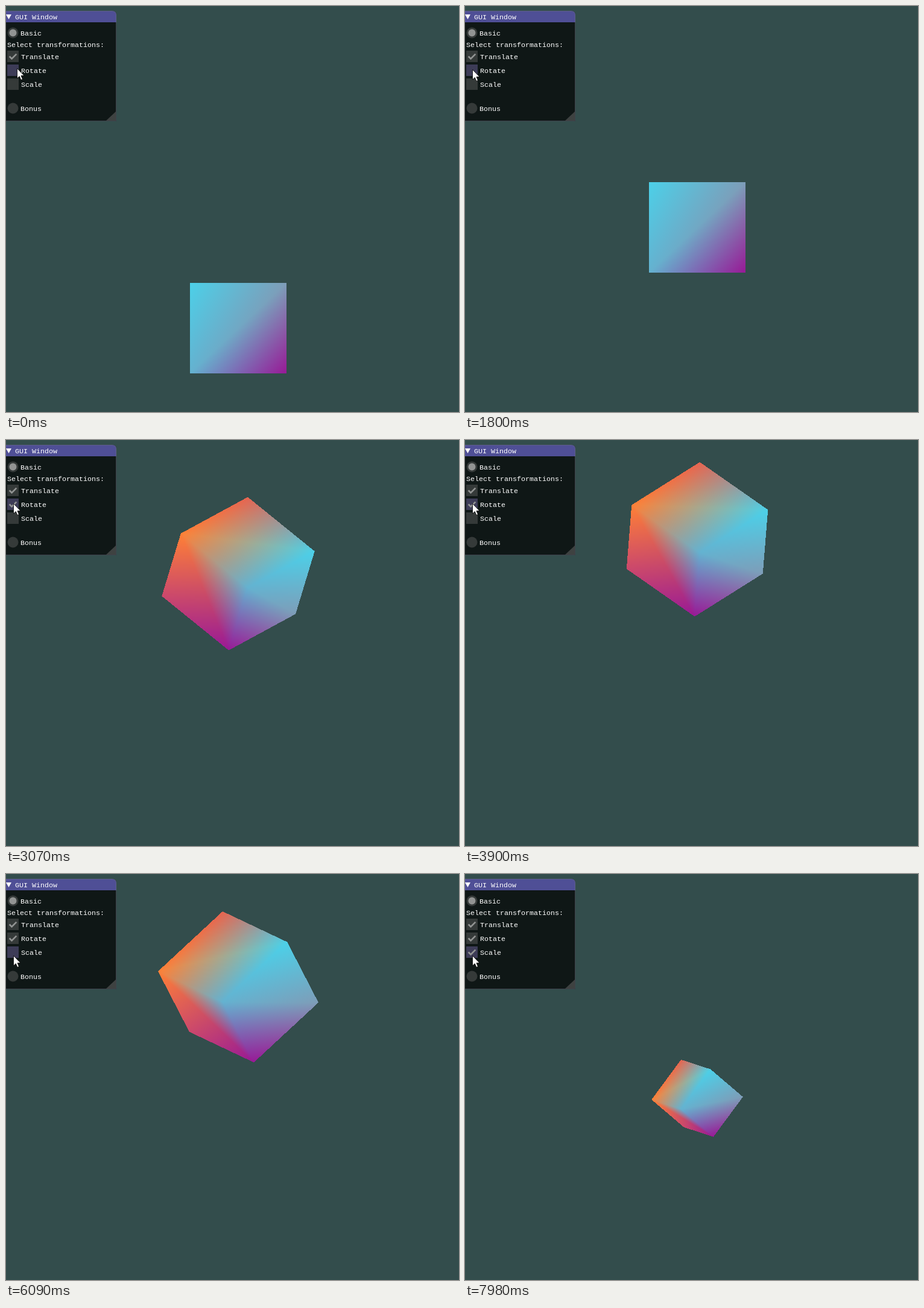
An HTML page with a canvas for the animation above (8 s loop, 751 by 673 pixels).

```html
<!DOCTYPE html>
<html lang="en">
<head>
<meta charset="utf-8">
<title>GUI Window</title>
<style>
  html, body { margin: 0; width: 100%; height: 100%; overflow: hidden; background: #334d4c; }
  canvas, svg { position: absolute; left: 0; top: 0; display: block; }
  text { font: 11.667px "Liberation Mono", "DejaVu Sans Mono", monospace; fill: #fff; white-space: pre; }
  .box { fill: #353a39; }
  .box.hover { fill: #3d3c57; }
  .tick { fill: none; stroke: #929493; stroke-width: 2.6; }
</style>
</head>
<body>
<canvas id="scene" width="751" height="673"></canvas>
<svg width="751" height="673" viewBox="0 0 751 673">
  <path d="M0 8H176Q183 8 183 15V191H0Z" fill="#0f1716"/>
  <path d="M0 8H176Q183 8 183 15V27H0Z" fill="#4f4f96"/>
  <path d="M166 190L182 175V190Z" fill="#3e4241"/>
  <path d="M0 8.5H175.5Q182.5 8.5 182.5 15.5V190.5H0" fill="none" stroke="#6e6e80" stroke-opacity=".5"/>
  <path d="M0 14H9L4.5 22Z" fill="#fff"/>
  <circle class="box" cx="11.5" cy="44.5" r="9"/>
  <circle cx="11.5" cy="44.5" r="6" fill="#929493"/>
  <circle class="box" cx="11.5" cy="169.5" r="9"/>
  <text x="15" y="22">GUI Window</text>
  <text x="24" y="49">Basic</text>
  <text x="2" y="68">Select transformations:</text>
  <text x="24" y="174">Bonus</text>
  <g id="checks"></g>
  <path id="cursor" d="M0 0V16.5L3.8 13L6.3 19L9 17.9L6.5 12H11.6Z" fill="#fff" stroke="#000" stroke-width=".8"/>
</svg>
<script>
const LOOP = 8000, WIDTH = 751, HEIGHT = 673;
const ROTATE_ON = 2240, SCALE_ON = 7680;
const ctx = document.getElementById('scene').getContext('2d');
const image = ctx.createImageData(WIDTH, HEIGHT);
const cursor = document.getElementById('cursor');

// [end time, equal steps since the previous end]
const pace = [[150, 1], [1090, 7], [1240, 1], [2240, 7], [2370, 1], [3350, 7], [3500, 1],
  [3900, 3], [4450, 4], [4580, 1], [5530, 7], [5660, 1], [6090, 3], [6680, 4], [6810, 1],
  [6960, 1], [7830, 6], [7980, 1], [LOOP, 1]];

const boxes = ['Translate', 'Rotate', 'Scale'].map((label, i) => {
  const y = 74 + 23 * i;
  const group = document.createElementNS('http://www.w3.org/2000/svg', 'g');
  group.innerHTML = `<rect class="box" x="2" y="${y}" width="19" height="19"/>
    <path class="tick" d="M5.65 ${y + 9.5}l3.9 3.9l7.8 -7.8"/>
    <text x="25" y="${y + 14}">${label}</text>`;
  document.getElementById('checks').append(group);
  return { y, rect: group.querySelector('rect'), tick: group.querySelector('.tick') };
});

const corner = (x, y, z, ...color) => ({ at: [x, y, z], color });
const frontTL = corner(-1, 1, 1, 76, 208, 232);
const frontTR = corner(1, 1, 1, 126, 157, 184);
const frontBL = corner(-1, -1, 1, 100, 178, 208);
const frontBR = corner(1, -1, 1, 152, 25, 150);
const backTL = corner(-1, 1, -1, 230, 100, 80);
const backBL = corner(-1, -1, -1, 255, 128, 54);
const backBR = corner(1, -1, -1, 204, 72, 108);
const triangles = [
  [frontTL, frontBL, frontTR], [frontBL, frontBR, frontTR],
  [backBL, frontTL, backTL], [backBL, frontTL, frontBL],
  [backBL, frontBR, backBR], [backBL, frontBR, frontBL],
];

const lerp = (a, b, k) => a + (b - a) * Math.min(1, Math.max(0, k));

function stepTime(t) {
  let start = 0;
  for (const [end, steps] of pace) {
    if (t < end) {
      const span = (end - start) / steps;
      return start + Math.floor((t - start) / span + 1e-6) * span;
    }
    start = end;
  }
  return start;
}

function shadeTriangle([a, b, c]) {
  const [ax, ay] = a.pos, [bx, by] = b.pos, [cx, cy] = c.pos;
  const area = (bx - ax) * (cy - ay) - (cx - ax) * (by - ay);
  if (Math.abs(area) < 1) return;
  const right = Math.max(ax, bx, cx), bottom = Math.max(ay, by, cy);
  for (let y = Math.floor(Math.min(ay, by, cy)); y < bottom; y++) {
    for (let x = Math.floor(Math.min(ax, bx, cx)); x < right; x++) {
      const px = x + .5, py = y + .5;
      const v = ((px - ax) * (cy - ay) - (cx - ax) * (py - ay)) / area;
      const w = ((bx - ax) * (py - ay) - (px - ax) * (by - ay)) / area;
      const u = 1 - v - w;
      if (Math.min(u, v, w) < -1e-9) continue;
      const i = (y * WIDTH + x) * 4;
      for (let k = 0; k < 3; k++) {
        image.data[i + k] = u * a.color[k] + v * b.color[k] + w * c.color[k];
      }
      image.data[i + 3] = 255;
    }
  }
}

function drawCube(t) {
  const phase = .000501 * (t - 4803);
  const centerY = 367 - 225 * Math.cos(phase);
  const angle = t < ROTATE_ON ? 0 : (84 - 20 * phase) * Math.PI / 180;
  const scale = t < SCALE_ON ? 1 : .547 + .00038 * (7980 - t);
  const cos = Math.cos(angle), tilt = Math.sin(angle) * Math.SQRT1_2;
  // Rotation about the axis (0, 1, -1), seen without perspective
  for (const point of new Set(triangles.flat())) {
    const [x, y, z] = point.at;
    point.pos = [
      385 + 80 * scale * (cos * x + tilt * (y + z)),
      centerY - 75 * scale * (-tilt * x + (1 + cos) / 2 * y - (1 - cos) / 2 * z),
    ];
  }
  image.data.fill(0);
  triangles.forEach(shadeTriangle);
  ctx.putImageData(image, 0, 0);
}

function drawPanel(t) {
  const settle = (t - 150) / 450;
  const x = lerp(18.5, 12.5, settle);
  const y = lerp(103.5, 105.5, settle) + lerp(0, 30, (t - 4580) / 500);
  cursor.setAttribute('transform', `translate(${x} ${y})`);
  const checked = [true, t >= ROTATE_ON, t >= SCALE_ON];
  boxes.forEach((box, i) => {
    box.rect.classList.toggle('hover', y >= box.y && y < box.y + 19);
    box.tick.style.display = checked[i] ? '' : 'none';
  });
}

const begin = performance.now();
let shown = -1;
function tick() {
  const t = stepTime((performance.now() - begin) % LOOP);
  if (t !== shown) {
    shown = t;
    drawCube(t);
    drawPanel(t);
  }
  requestAnimationFrame(tick);
}
tick();
</script>
</body>
</html>
```
